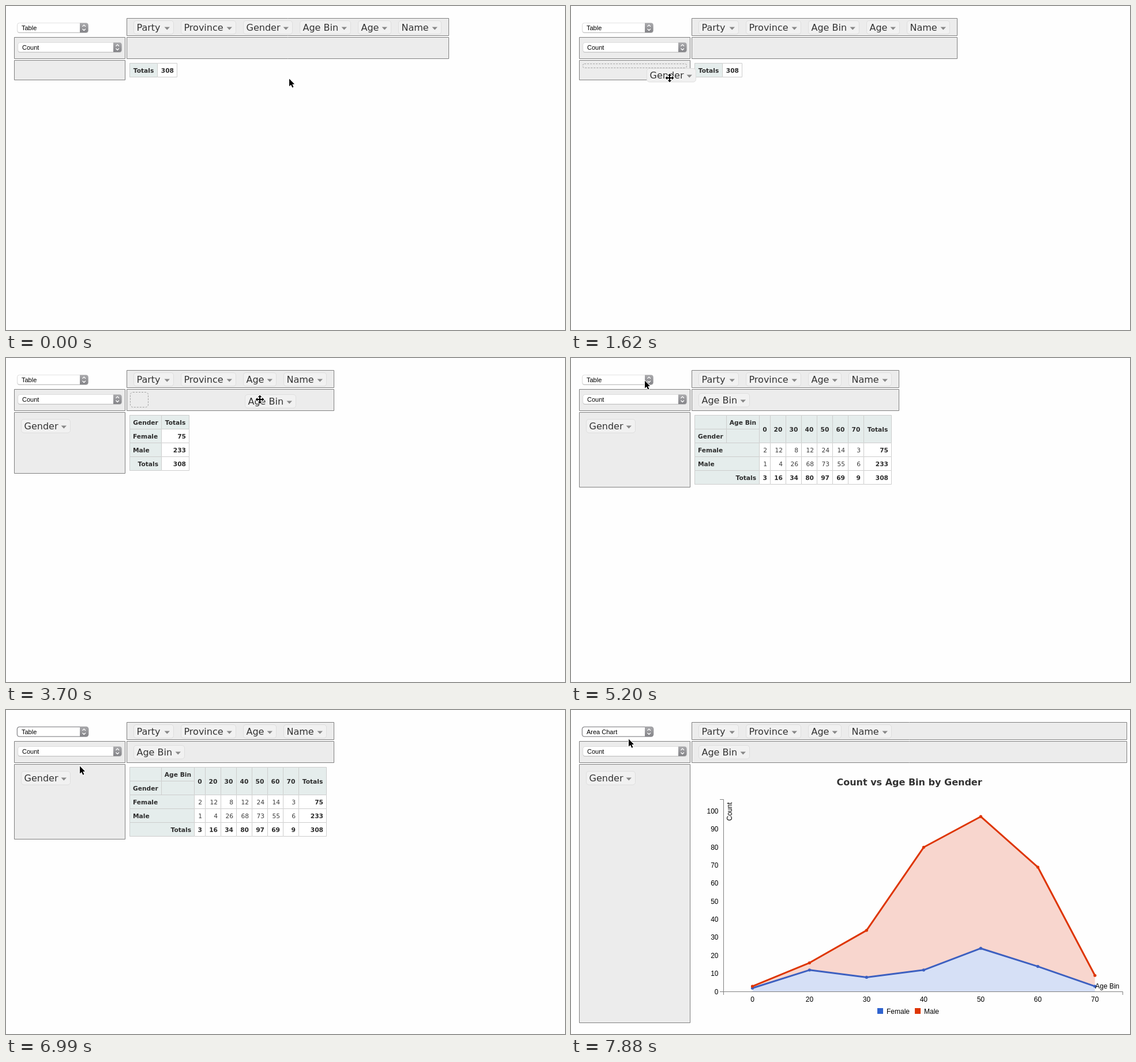
An HTML page with a canvas that plays this animation: 969x563 px, repeating every 8000 ms.

```html
<!DOCTYPE html>
<html lang="en">
<head>
<meta charset="utf-8">
<title>Pivot table</title>
<style>
  html, body { margin: 0; width: 100%; height: 100%; overflow: hidden; background: #fefefe; }
  canvas { display: block; }
</style>
</head>
<body>
<canvas id="stage" width="969" height="563"></canvas>
<script>
const ctx = document.getElementById('stage').getContext('2d');
const LOOP = 8000;
const SANS = '"DejaVu Sans", Verdana, sans-serif';
const UI = '"Liberation Sans", Arial, sans-serif';
const CELL = `10.67px ${SANS}`;
const CELL_BOLD = `bold ${CELL}`;

const chipWidth = { Party: 69, Province: 95, Gender: 85, 'Age Bin': 88, Age: 57, Name: 74 };
const attributes = Object.keys(chipWidth);
const bins = [0, 20, 30, 40, 50, 60, 70];
const female = [2, 12, 8, 12, 24, 14, 3];
const male = [1, 4, 26, 68, 73, 55, 6];
const both = female.map((n, i) => n + male[i]);
const menuItems = ['Table', 'Line Chart', 'Bar Chart', 'Stacked Bar Chart', 'Area Chart', 'Scatter Chart'];

// Drawing helpers

function text(str, x, y, font, color = '#000', align = 'left') {
  ctx.font = font;
  ctx.fillStyle = color;
  ctx.textAlign = align;
  ctx.fillText(str, x, y);
}

function rect(x, y, w, h, color) {
  ctx.fillStyle = color;
  ctx.fillRect(x, y, w, h);
}

function box(left, top, right, bottom, fill, line) {
  rect(left, top, right - left + 1, bottom - top + 1, fill);
  ctx.strokeStyle = line;
  ctx.lineWidth = 1;
  ctx.strokeRect(left + 0.5, top + 0.5, right - left, bottom - top);
}

function round(x, y, w, h, r, fill, line) {
  ctx.beginPath();
  ctx.roundRect(x, y, w, h, r);
  if (fill) { ctx.fillStyle = fill; ctx.fill(); }
  if (line) { ctx.strokeStyle = line; ctx.lineWidth = 1; ctx.stroke(); }
}

function trace(points, close) {
  ctx.beginPath();
  points.forEach(([x, y]) => ctx.lineTo(x, y));
  if (close) ctx.closePath();
}

function verticalGradient(top, bottom, from, to) {
  const g = ctx.createLinearGradient(0, top, 0, bottom);
  g.addColorStop(0, from);
  g.addColorStop(1, to);
  return g;
}

// Motion helpers

// The screen is sampled in n even steps, the first at start and the last at end.
function step(t, start, end, n) {
  const k = Math.floor((t + 6 - start) / (end - start) * (n - 1)) + 1;
  return Math.min(Math.max(k, 0), n) / n;
}
const smooth = p => p * p * (3 - 2 * p);
const mix = (a, b, p) => a.map((v, i) => v + (b[i] - v) * p);

function pointerAt(t) {
  if (t < 874) return mix([491, 126], [451, 42], smooth(step(t, 290, 730, 4)));
  if (t < 1920) return mix([451, 42], [171, 125], step(t, 880, 1620, 6) ** 1.86);
  if (t < 3254) return mix([163, 119], [437, 34], smooth(step(t, 2370, 2960, 5)));
  if (t < 4150) return mix([437, 34], [440, 72], step(t, 3260, 3700, 4));
  if (t < 5784) return mix([440, 70], [128, 39], smooth(step(t, 4600, 5200, 5)));
  if (t < 7724) return mix([128, 39], [128, 97], step(t, 5790, 6240, 4));
  return mix([128, 97], [100, 50], step(t, 7730, 7880, 2));
}

function dragAt(t, [x, y]) {
  const first = t >= 874 && t < 1920;
  if (!first && !(t >= 3254 && t < 4150)) return null;
  const grab = first ? [40, 17] : [26, 9];
  return {
    name: first ? 'Gender' : 'Age Bin',
    x: Math.round(x - grab[0]),
    y: Math.round(y - grab[1]),
    zone: y < 54 ? 'top' : x < 207 ? 'rows' : 'cols'
  };
}

// Widgets

function chip(name, x, y) {
  const w = chipWidth[name];
  round(x + 0.5, y + 0.5, w, 23.5, 4.5, '#f1f1f1', '#dedede');
  text(name, x + 5.5, y + 18, `16px ${SANS}`, '#333');
  const end = x + w;
  trace([[end - 15.5, y + 11.5], [end - 6, y + 11.5], [end - 10.75, y + 16.5]], true);
  ctx.fillStyle = '#888';
  ctx.fill();
}

function placeholder(x, y, w, h) {
  ctx.setLineDash([3, 2]);
  round(x + 0.5, y + 0.5, w - 1, h - 1, Math.min(4.5, h / 3), null, '#a2a2a2');
  ctx.setLineDash([]);
}

function select(label, x, y, w, focused) {
  if (focused) round(x - 0.8, y - 0.8, w + 1.6, 18.1, 4.5, '#8f8f93');
  else {
    round(x, y + 0.7, w, 16.7, 4, '#c2c2c2');
    round(x - 0.2, y - 0.2, w + 0.4, 16.7, 4, '#dadada');
  }
  round(x + 0.6, y + 0.5, w - 1.2, 15.6, 3.5, '#fff');
  const left = x + w - 14.5;
  round(left, y, 14.5, 16.5, [0, 4, 4, 0], verticalGradient(y, y + 16, '#aaaaad', '#858589'));
  ctx.strokeStyle = '#fff';
  ctx.lineWidth = 1.3;
  const cx = left + 7.2, cy = y + 8.2;
  for (const dir of [-1, 1]) {
    trace([[cx - 2.7, cy + 2 * dir], [cx, cy + 4.8 * dir], [cx + 2.7, cy + 2 * dir]]);
    ctx.stroke();
  }
  text(label, x + 7.5, y + 12.5, `11px ${UI}`);
}

function menu(pointerY, alpha) {
  const x = 9, y = 26, w = 140, h = 16;
  const active = Math.floor((pointerY - y - 4) / h);
  ctx.save();
  ctx.globalAlpha = alpha;
  ctx.shadowColor = 'rgba(0,0,0,.28)';
  ctx.shadowBlur = 16;
  ctx.shadowOffsetY = 7;
  round(x, y, w, menuItems.length * h + 8, 4.5, '#f8f8f8');
  ctx.shadowColor = 'transparent';
  menuItems.forEach((item, i) => {
    const top = y + 4 + i * h;
    const color = i === active ? '#fff' : '#000';
    if (i === active) rect(x, top, w, h, verticalGradient(top, top + h, '#98a0aa', '#7c8691'));
    text(item, 26.5, top + 12, `11px ${UI}`, color);
    if (i === 0) {
      trace([[14.5, top + 8], [17, top + 11], [21, top + 4.5]]);
      ctx.strokeStyle = color;
      ctx.lineWidth = 1.5;
      ctx.stroke();
    }
  });
  ctx.restore();
}

function arrowCursor(x, y) {
  trace([[0, 0], [0, 13], [3, 10.3], [5.3, 15.2], [7.4, 14.2], [5.2, 9.5], [9, 9.3]]
    .map(([dx, dy]) => [x + dx, y + 0.5 + dy]), true);
  ctx.lineJoin = 'round';
  ctx.lineWidth = 2;
  ctx.strokeStyle = '#fff';
  ctx.stroke();
  ctx.fillStyle = '#000';
  ctx.fill();
}

function moveCursor(x, y) {
  const arm = [[-1, -1], [-1, -4], [-3.3, -4], [0, -7.5], [3.3, -4], [1, -4], [1, -1]];
  const points = [0, 1, 2, 3].flatMap(q => arm.map(([a, b]) => {
    for (let i = 0; i < q; i++) [a, b] = [-b, a];
    return [x + a, y + b];
  }));
  trace(points, true);
  ctx.lineJoin = 'round';
  ctx.lineWidth = 2;
  ctx.strokeStyle = '#fff';
  ctx.stroke();
  ctx.fillStyle = '#000';
  ctx.fill();
}

// Result tables

const LINE = '#cdcdcd', HEAD = '#e5edec', INK = '#2c2c2c', SOFT = '#3d3d3d';

function cell(left, top, right, bottom, str, { head, align = 'right', bold = true } = {}) {
  box(left, top, right, bottom, head ? HEAD : '#fff', LINE);
  const x = { left: left + 6, right: right - 5, center: (left + right + 1) / 2 }[align];
  text(str, x, (top + bottom) / 2 + 5, bold ? CELL_BOLD : CELL, bold ? INK : SOFT, align);
}

const headLeft = { head: true, align: 'left' };
const headMid = { head: true, align: 'center' };
const headRight = { head: true };

function totalTable() {
  cell(214, 99, 262, 123, 'Totals', headMid);
  cell(262, 99, 296, 123, '308');
}

function genderTable() {
  cell(214, 99, 269, 123, 'Gender', headMid);
  cell(269, 99, 317, 123, 'Totals', headMid);
  [['Female', 75], ['Male', 233], ['Totals', 308]].forEach(([label, n], i) => {
    const y = 123 + i * 24;
    cell(214, y, 269, y + 24, label, i < 2 ? headLeft : headRight);
    cell(269, y, 317, y + 24, n);
  });
}

function crossTable() {
  const edge = i => i ? 318 + 27 * i : 326;
  cell(214, 99, 269, 123, '', headLeft);
  cell(269, 99, 326, 123, 'Age Bin', headRight);
  cell(214, 123, 269, 147, 'Gender', headLeft);
  cell(269, 123, 326, 147, '', headLeft);
  bins.forEach((bin, i) => cell(edge(i), 99, edge(i + 1), 147, bin, headMid));
  cell(507, 99, 555, 147, 'Totals', headMid);
  [['Female', female, 75], ['Male', male, 233], ['Totals', both, 308]].forEach(([label, data, sum], r) => {
    const y = 147 + r * 24, last = r === 2;
    cell(214, y, 326, y + 24, label, last ? headRight : headLeft);
    data.forEach((n, i) => cell(edge(i), y, edge(i + 1), y + 24, n, { bold: last }));
    cell(507, y, 555, y + 24, sum);
  });
}

function areaChart(alpha) {
  const font = `12px ${UI}`;
  const px = i => 314.5 + 98.95 * i;
  const py = n => 489.5 - 3.137 * n;
  const low = female.map((n, i) => [px(i), py(n)]);
  const high = both.map((n, i) => [px(i), py(n)]);
  const floor = [[px(6), py(0)], [px(0), py(0)]];

  text('Count vs Age Bin by Gender', 586.5, 131, `bold 16px ${SANS}`, '#333', 'center');

  ctx.save();
  ctx.globalAlpha = alpha;
  trace([...low, ...floor], true);
  ctx.fillStyle = '#d6e0f6';
  ctx.fill();
  trace([...high, ...low.slice().reverse()], true);
  ctx.fillStyle = '#f8d6ce';
  ctx.fill();
  ctx.restore();

  ctx.strokeStyle = '#808080';
  ctx.lineWidth = 1;
  trace([[258, 155.5], [264.5, 155.5], [264.5, 495]]);
  ctx.stroke();
  trace([[258, 489.5], [956.5, 489.5], [956.5, 495]]);
  ctx.stroke();

  ctx.save();
  ctx.globalAlpha = alpha;
  ctx.lineJoin = 'round';
  for (const [points, color] of [[low, '#3d60c0'], [high, '#de3502']]) {
    trace(points);
    ctx.strokeStyle = color;
    ctx.lineWidth = 3;
    ctx.stroke();
    ctx.fillStyle = color;
    for (const [x, y] of points) {
      ctx.beginPath();
      ctx.arc(x, y, 2.6, 0, Math.PI * 2);
      ctx.fill();
    }
  }
  ctx.restore();

  for (let n = 0; n <= 100; n += 10) text(n, 255.5, py(n) + 4, font, '#000', 'right');
  bins.forEach((bin, i) => text(bin, px(i), 507, font, '#000', 'center'));
  text('Age Bin', 908.5, 484, font);
  ctx.save();
  ctx.translate(279, 192.5);
  ctx.rotate(-Math.PI / 2);
  text('Count', 0, 0, font);
  ctx.restore();

  rect(531, 518, 10, 10, '#2f63cf');
  text('Female', 547, 528, font);
  rect(596, 518, 10, 10, '#de3502');
  text('Male', 612, 528, font);
}

// Whole scene

function draw(t) {
  const [x, y] = pointerAt(t);
  const drag = dragAt(t, [x, y]);
  const genderInRows = t >= 1920, ageInCols = t >= 4150, chart = t >= 7290;

  rect(0, 0, 969, 563, '#fefefe');

  const unused = attributes.filter(a => !(a === 'Gender' && genderInRows) && !(a === 'Age Bin' && ageInCols));
  let end = 221;
  const slots = [];
  for (const name of unused) {
    const held = drag && drag.name === name;
    slots.push({ name, x: end, held });
    if (!held) end += chipWidth[name] + 13;
    else if (drag.zone === 'top') end += 33;
  }
  const right = chart ? 963 : end;
  const bottom = chart ? 543 : ageInCols ? 224 : genderInRows ? 200 : 128;

  box(209, 21, right, 51, '#ececec', '#808080');
  box(209, 54, right, 91, '#ececec', '#808080');
  box(14, 54, 206, 91, '#ececec', '#808080');
  box(14, 94, 206, bottom, '#ececec', '#808080');

  for (const slot of slots) {
    if (!slot.held) chip(slot.name, slot.x, 25);
    else if (drag.zone === 'top') placeholder(slot.x - 6, 24, 32, 26);
  }
  if (genderInRows) chip('Gender', 26, 106);
  if (ageInCols) chip('Age Bin', 221, 61);
  if (drag && drag.zone === 'cols') placeholder(215, 59, 32, 27);
  if (drag && drag.zone === 'rows') placeholder(20, 100, 181, 8);

  select(chart ? 'Area Chart' : 'Table', 19.5, 29.5, 123, t >= 5490);
  select('Count', 20.5, 63.5, 180, false);

  if (chart) areaChart(t < 7430 ? 0.57 : 1);
  else if (ageInCols) crossTable();
  else if (genderInRows) genderTable();
  else totalTable();

  if (drag) chip(drag.name, drag.x, drag.y);
  if (t >= 5490 && t < 6990) menu(y, t < 6840 ? 1 : 0.5);

  const overChip = y >= 25 && y <= 49 &&
    slots.some(s => x >= s.x && x <= s.x + chipWidth[s.name]);
  if (drag || overChip) moveCursor(x, y);
  else arrowCursor(x, y);
}

function frame() {
  draw(performance.now() % LOOP);
  requestAnimationFrame(frame);
}
frame();
</script>
</body>
</html>
```
